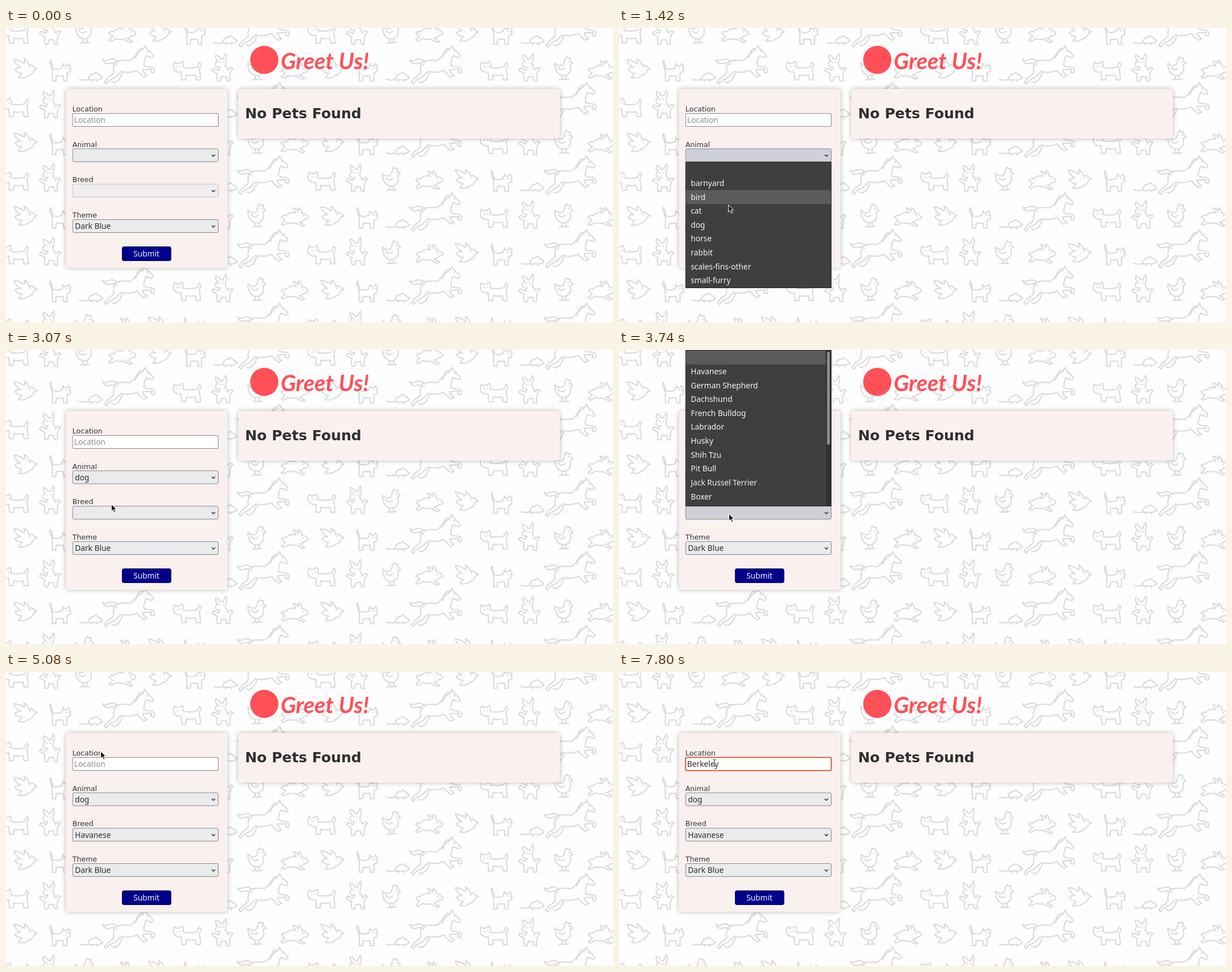
Recreate the animation shown at these times as an HTML page. Size 1074x521 px, loop 8000 ms.

```html
<!DOCTYPE html>
<html lang="en">
<head>
<meta charset="utf-8">
<title>Pet search form</title>
<style>
  html, body { margin: 0; width: 100%; height: 100%; overflow: hidden; background: #fefefe; }
  svg { display: block; }
  text { white-space: pre; font: 13.8px "Noto Sans", "Open Sans", sans-serif; fill: #2c2c2c; }
  .label { font: 12.6px "DejaVu Sans", sans-serif; fill: #333; }
  .title { font: bold 25.2px "DejaVu Sans", sans-serif; fill: #2f2f2f; }
  .brand { font: italic bold 40px Lato, sans-serif; fill: #ff5058; }
  .light { fill: #f4f4f4; }
  .panel { fill: #faf1ef; filter: drop-shadow(0 0 4px rgba(0, 0, 0, .28)); }
  #herd { fill: none; stroke: #dbdbdb; stroke-width: 2.2; stroke-linejoin: round; stroke-linecap: round; }
</style>
</head>
<body>
<svg width="1074" height="521" viewBox="0 0 1074 521">
  <defs>
    <g id="herd">
      <path d="M14 56q3 10 12 14q-8 0-10 4q4 6 12 6l-6 8q12 2 18-4q8-2 10-10l5-2-5-3q-4-5-9-2q-2-9-9-12q2 6 0 8q-8-6-18-7zm28 14h1"/>
      <path d="M79 58q-3 2 0 8l3 10v18h6l1-9h12l1 9h6v-14l6-3v-9l-3-5-3 4h-5l-2-4-2 8q-8 4-16 1l-3-12q-1-4-2-2zm27 13h1m4 0h1"/>
      <path d="M130 91q8 3 16 0q0-9 10-10q3-4 6 0q5 3 9 7q-4 4-10 4h-14m4 0v3m10-3v3"/>
      <path d="M242 38l4-7 3 6q7 5 12 12q0 4-5 3l-8-3q-4 8-4 17q3 3 13 3q9 2 4 11l-5-2 2-5-16 1q1 6 8 10l-6 3q-9-7-12-12q-14 6-28 2q-7 6-10 10l-12 6-4 6-4-3 6-8q8-4 11-10q-2-4 0-8q-1-7 4-11q12-3 24-1q9-5 15-18q4-6 8-2M198 61q-6-8-15-5q-9 4-12 0q4 9 12 7q7-3 13 2M242 38q-10 5-13 15M250 42h1M206 80l-6 12-8 5-5-2"/>
      <path d="M296 68l2-8 4 3 6-1 4-3q3 4 2 11q14 2 24-1l4-8 3 3-3 9q2 10 2 19h-7l-2-9q-9 2-16 0l-1 9h-7l-1-14q-8 1-9-2q-4 0-5-8zm7 1h1m5-1h1"/>
      <path d="M371 48q-1 8 4 10q-6 4-4 9q3 4 8 2l-3 6-9-4-3 4 10 6q-2 6 0 13h5l2-8h8l2 8h5q-1-12 2-18l4-4-4-2-6 4q-1-6-4-8l1-8q3-6 0-13q-3 5-5 10h-4q-3-6-9-7zm6 13h1m5 0h1"/>
      <path d="M440 84q-12-4-12-22q5 6 13 4q4-2 5-12l3-3 3 3 3-1 1 6 4 4-5 2q4 14-8 19q-4 1-7 0zm1 0v7l-5 1m5-1h4m3-7v7l-4 1m4-1h5M434 70q6 7 12 1M452 60h1"/>
      <path d="M487 74q4-4 8-2q8-8 18-5l-5-9q6 0 9 6l1-7q6 5 5 10q8 1 12 7q0 4-8 5q-3 4-8 4l10 6-4 2-12-6q-9 1-13-1l-9 5-4-2 7-7q-4-2-4-4q-2 0-3-2zm38-2h1"/>
    </g>
  </defs>
  <g id="backdrop"></g>
  <circle cx="457" cy="56.5" r="25" fill="#ff5058"/>
  <text class="brand" x="486" y="73">Greet Us!</text>
  <rect class="panel" x="106" y="108" width="286" height="317" rx="5"/>
  <rect class="panel" x="411" y="108" width="569" height="88" rx="5"/>
  <text class="title" x="423" y="160">No Pets Found</text>
  <rect x="205.5" y="387.5" width="86.5" height="25" rx="3" fill="#00008b" stroke="#1c1c50"/>
  <text class="light" x="248.5" y="405" text-anchor="middle">Submit</text>
  <g id="live"></g>
</svg>
<script>
const LOOP = 8000, ROW = 24.62;
const animals = ["", "barnyard", "bird", "cat", "dog", "horse", "rabbit", "scales-fins-other", "small-furry"];
const breeds = ["", "Havanese", "German Shepherd", "Dachshund", "French Bulldog", "Labrador", "Husky",
  "Shih Tzu", "Pit Bull", "Jack Russel Terrier", "Boxer"];
const keyTimes = [6440, 6540, 6730, 7320, 7420, 7510, 7610, 7700];

// Pointer legs: first step, last step, end point
const legs = [
  [200, 660, 198, 225], [1050, 1420, 193, 313], [1520, 1620, 184, 357], [1810, 1900, 173, 349],
  [2780, 3070, 186, 273], [3360, 3460, 194, 290], [3940, 4500, 155, 41], [4700, 5360, 169, 160],
  [5650, 5650, 169, 161]
];

const live = document.getElementById("live");
const rect = (x, y, w, h, fill, more = "") =>
  `<rect x="${x}" y="${y}" width="${w}" height="${h}" fill="${fill}" ${more}/>`;
const text = (x, y, str, more = "") => `<text x="${x}" y="${y}" ${more}>${str}</text>`;

function pointer(t) {
  let x = 232, y = -38;
  for (const [start, end, toX, toY] of legs) {
    if (t < start) break;
    const n = Math.round((end - start) / 96) + 1;
    const step = n > 1 ? (end - start) / (n - 1) : 1;
    const k = Math.min(n, Math.floor((t - start + .5) / step) + 1);
    const e = Math.sin(k / n * Math.PI / 2);
    x += (toX - x) * e;
    y += (toY - y) * e;
  }
  return { x: Math.round(x), y: Math.round(y) };
}

function select(y, name, value, hover, enabled = true) {
  const fill = !enabled ? "#f1eef1" : hover ? "#d0d1d8" : "#e9ebec";
  return text(117.5, y - 66 + 62.5, name, 'class="label"') +
    rect(118, y, 257.5, 23, fill, `rx="2.5" stroke="${enabled ? "#85858c" : "#c6c3c6"}"`) +
    text(122, y + 16.8, value) +
    `<path d="M364 ${y + 10.5}l3 3 3-3" fill="none" stroke="#222" stroke-width="1.3"/>`;
}

function list(top, height, items, y, scrolls) {
  const first = top + 0.5;
  const row = Math.floor((y - first) / ROW);
  const active = row >= 0 && row < items.length ? row : 0;
  return rect(118, top, 257.5, height, "#3f3f3f", 'stroke="#262626"') +
    rect(118.5, first + active * ROW, scrolls ? 247 : 256.5, ROW, "#5b5b5b") +
    items.map((s, i) => text(127, first + i * ROW + 17.3, s, 'class="light"')).join("") +
    (scrolls ? rect(366, top, 9.5, height, "#303030") + rect(368, 3, 5, 165, "#8b8b8b", 'rx="2.5"') : "");
}

function drawPointer({ x, y }, beam) {
  if (beam) {
    const d = `M${x - 2.5} ${y - 5.5}h2l.5.5.5-.5h2M${x} ${y - 5}v10M${x - 2.5} ${y + 5.5}h2l.5-.5.5.5h2`;
    return `<path d="${d}" fill="none" stroke="#fff" stroke-width="3"/>
      <path d="${d}" fill="none" stroke="#222" stroke-width="1.1"/>`;
  }
  return `<path d="M${x + .5} ${y + .5}v12.5l3-2.7 2.2 4.9 2.2-1-2.2-4.7h4z"
    fill="#161616" stroke="#fff" stroke-width="1"/>`;
}

function draw(t) {
  const p = pointer(t), lastY = pointer(t - 96).y;
  const animalOpen = t >= 950 && t < 2190, breedOpen = t >= 3650 && t < 4700;
  const open = animalOpen || breedOpen;
  const over = y => t >= 200 && !open && p.y >= y && p.y < y + 23;
  const focused = t >= 5360;
  const typed = "Berkeley".slice(0, keyTimes.filter(k => t >= k).length);

  let out = text(117.5, 147.5, "Location", 'class="label"');
  if (focused) out += rect(116, 149.5, 261.5, 27, "#f8cdb8", 'rx="4"');
  out += rect(118, 151.5, 257.5, 23, "#fff",
    focused ? 'rx="2" stroke="#b5562f" stroke-width="1.6"' : 'rx="1.5" stroke="#85858c"');
  out += typed ? text(120.5, 168, typed, 'id="typed"') : text(120.5, 168, "Location", 'style="fill:#8b8b8b"');
  if (typed && t < 7800) out += rect(0, 156, 1, 15, "#222", 'id="caret"');

  out += select(214, "Animal", t >= 2190 ? "dog" : "", animalOpen || over(214));
  out += select(276.8, "Breed", t >= 4700 ? "Havanese" : "", breedOpen || over(276.8), t >= 2780);
  out += select(339.5, "Theme", "Dark Blue", over(339.5));
  if (animalOpen) out += list(237.5, 223, animals, lastY, false);
  if (breedOpen) out += list(0.5, 276, breeds, lastY, true);
  if (t >= 200) out += drawPointer(p, over(151.5));
  live.innerHTML = out;

  const caret = document.getElementById("caret");
  if (caret) caret.setAttribute("x", 120.5 + document.getElementById("typed").getComputedTextLength());
}

// Alternate rows of the wallpaper are shifted sideways
let herds = "";
for (let r = -1; r < 8; r++)
  for (let c = -1; c < 2; c++)
    herds += `<use href="#herd" x="${(r % 2 ? 238 : 0) + c * 543}" y="${r * 65.2}"/>`;
document.getElementById("backdrop").innerHTML = herds;

const begin = performance.now();
function frame() {
  draw((performance.now() - begin) % LOOP);
  requestAnimationFrame(frame);
}
frame();
</script>
</body>
</html>
```
